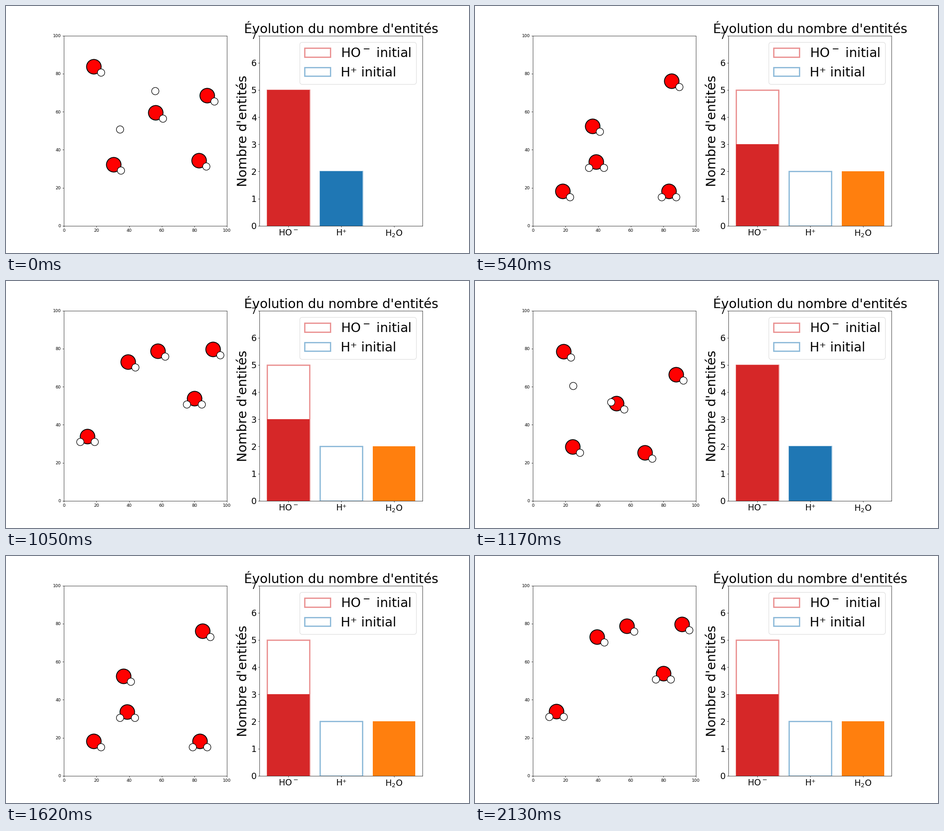
A matplotlib script that plays this animation: 1025 by 547 pixels, repeating every 2.16 s.

```python
import numpy as np
import matplotlib.pyplot as plt
from matplotlib.animation import FuncAnimation

FRAMES, CYCLE = 72, 36
KNOTS = [0, 9, 26, 35]
WALLS = {"L": (0, 5.5), "R": (0, 94.5), "B": (1, 5.5), "T": (1, 94.5)}
SITE_R, SITE_L = np.array([4.5, -3.05]), np.array([-4.5, -3.05])

# Oxygen waypoints, with the walls hit on each leg
OXYGENS = [
    ([(18.2, 83.8), (20.2, 68.1), (55.4, 8.0), (79.9, 53.9)], ["", "B", ""]),
    ([(56.2, 59.6), (41.5, 34.7), (68.6, 7.6), (14.3, 34.0)], ["", "RB", ""]),
    ([(87.8, 68.5), (87.5, 62.5), (83.0, 88.4), (91.3, 79.7)], ["", "", "T"]),
    ([(30.4, 32.3), (11.8, 20.7), (35.0, 42.9), (57.6, 78.9)], ["", "LB", ""]),
    ([(82.8, 34.4), (40.0, 7.1), (33.2, 92.9), (39.2, 73.2)], ["", "", ""]),
]
PROTONS = [((34.3, 50.7), 0, 6), ((55.9, 71.0), 1, 4)]


def travel(a, b, t, hits):
    """Straight run from a to b, mirrored at each wall in hits."""
    a, b = np.array(a), np.array(b)
    for h in hits:
        axis, wall = WALLS[h]
        b[axis] = 2 * wall - b[axis]
    p = a + (b - a) * t
    for h in hits:
        axis, wall = WALLS[h]
        side = 1 if h in "LB" else -1
        p[axis] = wall + side * abs(p[axis] - wall)
    return p


def oxygen_at(i, step):
    points, hits = OXYGENS[i]
    leg = 0 if step < KNOTS[1] else 1 if step < KNOTS[2] else 2
    t = (step - KNOTS[leg]) / (KNOTS[leg + 1] - KNOTS[leg])
    return travel(points[leg], points[leg + 1], t, hits[leg])


def proton_at(start, i, join, step):
    if step >= join:
        return oxygen_at(i, step) + SITE_L
    return travel(start, oxygen_at(i, join) + SITE_L, step / join, "")


dpi = 1025 / 15
fig, (box, chart) = plt.subplots(1, 2, figsize=(15, 8.0049), dpi=dpi)

box.set(xlim=(0, 100), ylim=(0, 100))
big, = box.plot([], [], "o", ms=34, mfc="red", mec="black", mew=2)
small, = box.plot([], [], "o", ms=17, mfc="white", mec="black", mew=1.3)

names = ["HO$^-$", "H⁺", "H$_2$O"]
bars = chart.bar(names, [5, 2, 2], color=["tab:red", "tab:blue", "tab:orange"])
for x, n, color in [(0, 5, "tab:red"), (1, 2, "tab:blue")]:
    chart.bar(x, n, fill=False, edgecolor=color, lw=3, alpha=0.5,
              label=names[x] + " initial")
chart.set(xlim=(-0.54, 2.54), ylim=(0, 7))
chart.set_title("Évolution du nombre d'entités", fontsize=30)
chart.set_ylabel("Nombre d'entités", fontsize=30)
chart.tick_params(labelsize=20)
chart.legend(fontsize=30, loc="upper right")


def update(frame):
    step = frame % CYCLE
    oxy = np.array([oxygen_at(i, step) for i in range(len(OXYGENS))])
    free = [proton_at(*p, step) for p in PROTONS]
    big.set_data(*oxy.T)
    small.set_data(*np.vstack([oxy + SITE_R, free]).T)
    water = sum(step >= join for _, _, join in PROTONS)
    for bar, n in zip(bars, (5 - water, 2 - water, water)):
        bar.set_height(n)
    return big, small, *bars


anim = FuncAnimation(fig, update, frames=FRAMES, interval=30,
                     repeat=True, repeat_delay=0)
plt.show()
```
